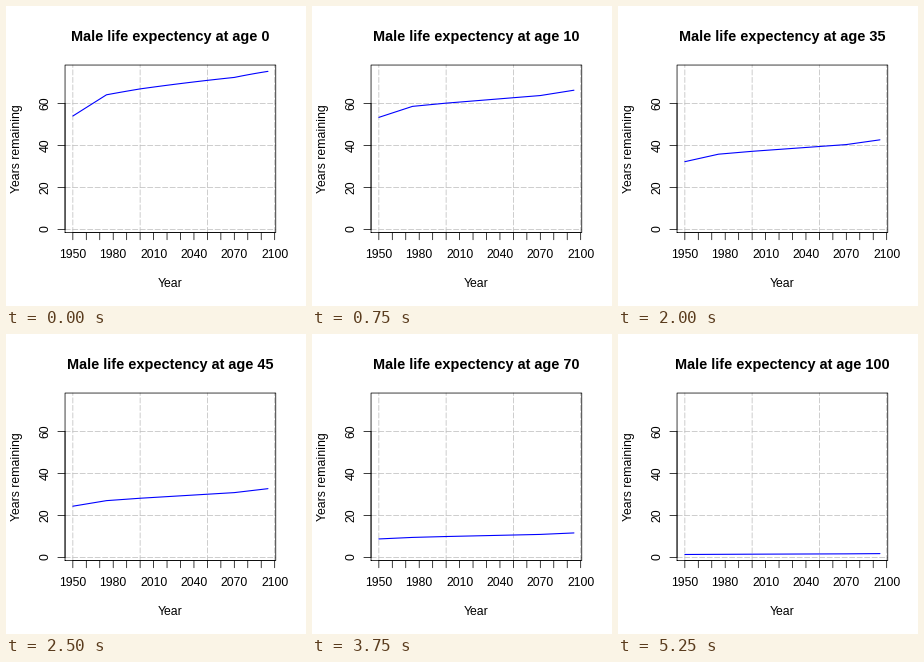
A matplotlib script that plays this animation: 300x300 px, repeating every 5500 ms.

```python
import numpy as np
import matplotlib.pyplot as plt
from matplotlib.animation import FuncAnimation

SIZE, DPI = 300, 100
PT = 72 / DPI                      # points per pixel
LEFT, RIGHT, TOP, BOTTOM = 59.04, 269.76, 59.04, 226.56
INTERVAL = 250

plt.rcParams["font.family"] = "Liberation Sans"

AGES = [0, 1, *range(5, 101, 5)]
YEARS = np.arange(1950, 2100, 5)


def scale(low, high, start, end):
    """Map low..high to start..end with a 4 % margin on both sides."""
    pad = (end - start) * 0.04 / 1.08
    return lambda v: start + pad + (v - low) / (high - low) * (end - start - 2 * pad)


x_pos = scale(1950, 2095, LEFT, RIGHT)
y_pos = scale(1.45, 75.3, BOTTOM, TOP)


def remaining(age):
    """Remaining years over time: a soft ramp down with age plus later gains."""
    early = np.clip((YEARS - 1950) / 25, 0, 1)
    late = np.interp(YEARS, [1975, 2000, 2070, 2095], [0, 0.2, 0.67, 1])
    base = 0.872 * 13.8 * np.log1p(np.exp((71 - age) / 13.8))
    gain = 13.6 / (1 + np.exp((age - 51.5) / 14))
    early_share = 0.43 - 0.0025 * age
    infant_loss = 8 * 0.25 ** age * (1 - 0.55 * early) * (1 - late) ** 2
    return base + gain * (early_share * early + (1 - early_share) * late) - infant_loss


fig = plt.figure(figsize=(SIZE / DPI, SIZE / DPI), dpi=DPI, facecolor="white")
ax = fig.add_axes([0, 0, 1, 1])
ax.set(xlim=(0, SIZE), ylim=(SIZE, 0))
ax.axis("off")


def line(xs, ys, color="black", width=0.75, **kwargs):
    return ax.plot(xs, ys, color=color, lw=width * PT, snap=False,
                   solid_capstyle="round", dash_capstyle="round", **kwargs)[0]


def label(x, y, text, size=12.2, **kwargs):
    return ax.text(x, y, text, fontsize=size * PT, ha="center", va="baseline",
                   rotation_mode="anchor", **kwargs)


grid = dict(color="#bebebe", linestyle=(0, (7, 3)), zorder=1)
for value in range(0, 61, 20):
    y = y_pos(value)
    line([LEFT, RIGHT], [y, y], **grid)
    line([LEFT, LEFT - 7.2], [y, y])
    label(42.5, y - 0.5, str(value), rotation=90)
for year in range(1950, 2101, 10):
    x = x_pos(year)
    if year % 50 == 0:
        line([x, x], [BOTTOM, TOP], **grid)
    line([x, x], [BOTTOM, BOTTOM + 7.2])
    if year % 30 == 0:
        label(x, 252, str(year))

line([LEFT, RIGHT, RIGHT, LEFT, LEFT], [BOTTOM, BOTTOM, TOP, TOP, BOTTOM])
line([LEFT, LEFT], [y_pos(0), y_pos(60)])
line([x_pos(1950), x_pos(2100)], [BOTTOM, BOTTOM])
label(164.4, 281, "Year")
label(13.6, 142.3, "Years remaining", rotation=90)

title = label(164.2, 35, "", size=14.5, weight="bold")
curve = line([], [], color="blue", width=1.1, zorder=3)


def update(index):
    age = AGES[index]
    title.set_text(f"Male life expectency at age {age}")
    curve.set_data(x_pos(YEARS), y_pos(remaining(age)))
    return title, curve


anim = FuncAnimation(fig, update, frames=len(AGES), interval=INTERVAL,
                     repeat=True, repeat_delay=0)
plt.show()
```
